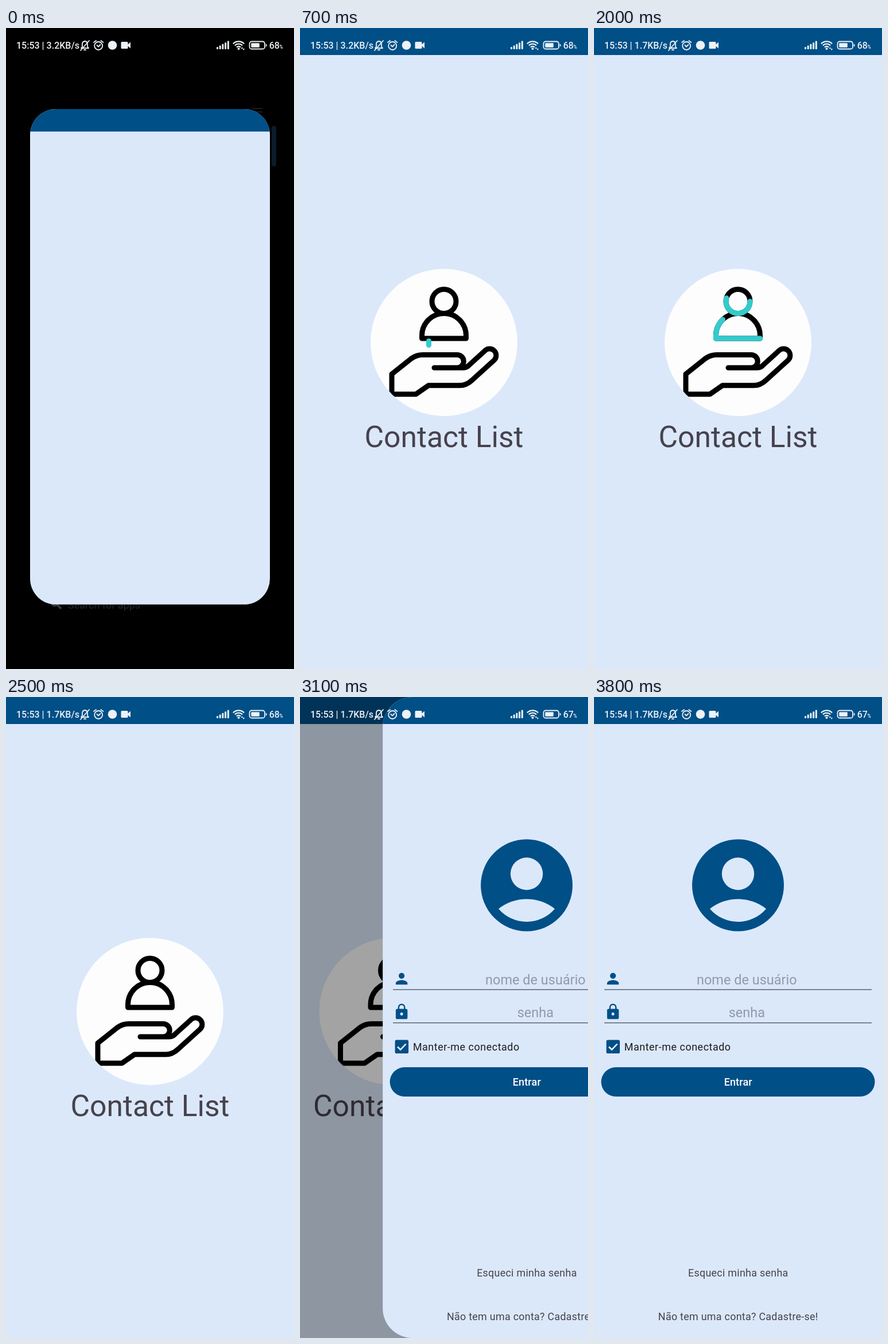
An HTML page for the animation above (3900 ms loop, 502 px wide and 1115 px high).

```html
<!DOCTYPE html>
<html lang="pt">
<head>
<meta charset="utf-8">
<title>Contact List</title>
<style>
  html, body { margin: 0; width: 100%; height: 100%; overflow: hidden; background: #000; }
  svg { display: block; width: 502px; height: 1115px; font-family: Roboto, sans-serif; }
  .paper { fill: #dbe8fa; }
  .blue { fill: #004f87; }
  .ink { fill: none; stroke: #000; stroke-width: 9; stroke-linecap: round; stroke-linejoin: round; }
  .teal { stroke: #33cbcd; }
  .soft { fill: #46424d; }
  .mid { text-anchor: middle; }
  .hint { font-size: 23.5px; fill: #9399a9; }
  .small { font-size: 17.9px; letter-spacing: .28px; }
  .rule { stroke: #5d6371; stroke-width: 1.4; }
  #bar { fill: #edf2f6; font-weight: 500; font-size: 16px; }
  #bar .line { fill: none; stroke: #edf2f6; stroke-width: 1.8; stroke-linecap: round; stroke-linejoin: round; }
</style>
</head>
<body>
<svg viewBox="0 0 502 1115">
  <defs>
    <clipPath id="openClip"><rect id="openBox" width="502" height="1115"/></clipPath>
    <clipPath id="loginClip"><rect id="loginBox" width="620" height="1115"/></clipPath>
    <clipPath id="disc"><circle cx="251" cy="547" r="128"/></clipPath>
  </defs>
  <rect width="502" height="1115"/>

  <g id="launcher">
    <path d="M429 140H447M429 146H447" stroke="#262626" stroke-width="1.5"/>
    <rect x="463" y="170" width="8" height="71" rx="4" fill="#0c1a2a"/>
    <circle cx="85" cy="999" r="6" fill="none" stroke="#3c3c3c" stroke-width="3"/>
    <path d="M89 1003L96 1010" stroke="#3c3c3c" stroke-width="3.4"/>
    <text x="108" y="1010" font-size="18" fill="#262626">Search for apps</text>
  </g>

  <g id="splash">
    <g clip-path="url(#openClip)">
      <rect class="paper" width="502" height="1115"/>
      <rect class="blue" width="502" height="47"/>
      <g id="content">
        <circle cx="251" cy="547" r="128" fill="#fdfdfe"/>
        <g clip-path="url(#disc)">
          <path class="ink" d="M234 591H274A11.2 11.2 0 0 0 274 568.5H214Q203 568.5 194 575L160 602V637H202L224 621.8H278Q290 622 300 612.5L338.7 577.5A11.5 11.5 0 0 0 323.3 560.5L293 588Q289.500 591 284 591H270"/>
          <g id="person" class="ink">
            <path d="M272 475.500A21 21 0 0 0 230 475.500A21 21 0 0 0 272 475.500Z"/>
            <path d="M289.500 540V535A38.500 38.500 0 0 0 212.500 535V540Z"/>
          </g>
          <g id="trace"></g>
          <g id="dashes"></g>
        </g>
        <text class="soft mid" x="251" y="729" font-size="51.6">Contact List</text>
      </g>
    </g>
    <rect id="dim" width="502" height="1115" opacity="0"/>
  </g>

  <g id="login">
    <g clip-path="url(#loginClip)">
      <rect class="paper" width="620" height="1115"/>
      <rect class="blue" width="620" height="47"/>
      <circle class="blue" cx="251" cy="327.5" r="80"/>
      <circle class="paper" cx="251" cy="307.5" r="28.2"/>
      <path class="paper" d="M202 368.500A79 79 0 0 1 300 368.500A64.600 64.600 0 0 1 202 368.500Z"/>
      <path class="blue" transform="translate(17.7 474.700) scale(1.278)" d="M12 12a4 4 0 1 0 0-8a4 4 0 0 0 0 8zm0 2c-2.670 0-8 1.340-8 4v2h16v-2c0-2.660-5.330-4-8-4z"/>
      <path class="blue" fill-rule="evenodd" transform="translate(17.7 532.200) scale(1.278)" d="M18 8h-1V6A5 5 0 0 0 7 6v2H6a2 2 0 0 0-2 2v10a2 2 0 0 0 2 2h12a2 2 0 0 0 2-2V10a2 2 0 0 0-2-2zm-6 9a2 2 0 1 1 0-4a2 2 0 0 1 0 4zm3.100-9H8.900V6a3.100 3.100 0 0 1 6.200 0z"/>
      <path class="rule" d="M18 509H484M18 566.700H484"/>
      <text class="hint mid" x="266.300" y="500">nome de usuário</text>
      <text class="hint mid" x="266.300" y="557">senha</text>
      <rect class="blue" x="21.500" y="596.500" width="23.500" height="23.500" rx="2.600"/>
      <path d="M26 608.500L31 613.500L40.500 603.500" fill="none" stroke="#fff" stroke-width="2.500"/>
      <text class="small" x="52.800" y="615" fill="#1b1b20" style="letter-spacing:.55px">Manter-me conectado</text>
      <rect class="blue" x="12.500" y="644" width="477" height="51" rx="25.500"/>
      <text class="mid" x="251.200" y="676.300" font-size="18" font-weight="500" letter-spacing=".13" fill="#fff">Entrar</text>
      <text class="small soft mid" x="251.300" y="1008">Esqueci minha senha</text>
      <text class="small soft mid" x="251.300" y="1084">Não tem uma conta? Cadastre-se!</text>
    </g>
  </g>

  <g id="bar">
    <text id="clock" x="18" y="36"></text>
    <path class="line" d="M131 35H144L142 32.500V28Q142 23.500 137.500 23Q133 23.500 133 28V32.500ZM136 38H139M145 22L130 39"/>
    <circle class="line" cx="161.200" cy="31" r="7"/>
    <path class="line" d="M153 25L157 22M169.400 25L165.400 22M158.500 30L161 32.500L164.500 29"/>
    <circle cx="185.500" cy="30" r="7.800"/>
    <path d="M202 24H211Q212.500 24 212.500 25.500V28.500L217 24.500V35.500L212.500 31.500V34.500Q212.500 36 211 36H202Q200.500 36 200.500 34.500V25.500Q200.500 24 202 24Z"/>
    <g id="bars"></g>
    <g id="wifi" class="line" style="stroke-width:2.300;stroke-linecap:butt"></g>
    <circle cx="405.500" cy="36" r="2"/>
    <path d="M409.700 36L411.500 33L413 36ZM412.600 36L414.200 39L416 36Z"/>
    <rect class="line" x="424.500" y="23.500" width="26.500" height="13" rx="3.600"/>
    <rect x="427.300" y="26.300" width="14.500" height="7.400" rx="1"/>
    <path d="M452.800 27.500Q454.800 28 454.800 30T452.800 32.500Z"/>
    <text id="charge" x="458.700" y="36"></text>
    <text x="476.600" y="36" font-size="8.500" font-weight="700">%</text>
  </g>
</svg>
<script>
  const LOOP = 3900, STEP = 100;
  const $ = id => document.getElementById(id);
  const set = (el, attrs) => { for (const k in attrs) el.setAttribute(k, attrs[k]); return el; };
  const add = (parent, tag, attrs) =>
    parent.appendChild(set(document.createElementNS('http://www.w3.org/2000/svg', tag), attrs));
  const clamp = x => Math.min(1, Math.max(0, x));
  const ramp = (t, a, b) => clamp((t - a) / (b - a));
  const show = (el, on) => { el.style.display = on ? '' : 'none'; };

  // Distance left on a critically damped spring
  const rest = x => x <= 0 ? 1 : (1 + x) * Math.exp(-x);
  const RATE = 0.0169;

  for (let i = 0; i < 5; i++) {
    const h = 4 + i * 2.600;
    add($('bars'), 'rect', { x: 367 + i * 4.700, y: 37 - h, width: 3, height: h, rx: 1 });
  }
  for (const r of [5, 9.300, 13.600]) {
    const d = r * Math.SQRT1_2;
    add($('wifi'), 'path', { d: `M${405.500 - d} ${37 - d}A${r} ${r} 0 0 1 ${405.500 + d} ${37 - d}` });
  }

  const traces = [...$('person').children].map(p =>
    add($('trace'), 'path', { d: p.getAttribute('d'), class: 'ink teal', pathLength: 100 }));
  const dashes = [224.500, 251, 277.500].map(x =>
    add($('dashes'), 'line', { x1: x, x2: x, class: 'ink teal' }));

  function drawIcon(t) {
    const from = 100 * ramp(t, 1750, 2300), to = 100 * ramp(t, 980, 1580);
    for (const p of traces) {
      show(p, to > from);
      set(p, { 'stroke-dasharray': `${to - from} 200`, 'stroke-dashoffset': -from });
    }
    dashes.forEach((line, i) => {
      const s = t - 650 - i * 100;
      show(line, s > 0 && s < 250);
      set(line, { y1: 551.500 - 7 * ramp(s, 100, 250), y2: 551.500 - 7 * ramp(s, 0, 50) });
    });
  }

  function draw(t) {
    const r = t < 500 ? rest(3 + RATE * t) / rest(3) : 0;
    const left = rest(RATE * (t - 2952)), p = 1 - left;

    set($('launcher'), { opacity: clamp(r * 1.3 - 0.3) });
    set($('openBox'), { height: 1115 - 80 * r, rx: 54 * clamp(4 * r) });
    set($('splash'), {
      transform: `translate(${42 * r - 125.500 * p} ${141 * r}) scale(${1 - r * 84 / 502})`
    });
    set($('dim'), { x: 125.500 * p, opacity: p / 2 });
    show($('dim'), p > 0);
    show($('content'), t >= 500);
    drawIcon(t);

    show($('login'), p > 0);
    set($('login'), { transform: `translate(${502 * left} 0)` });
    set($('loginBox'), { rx: 52 * clamp(left * 40) });

    $('clock').textContent = `15:${t < 3700 ? 53 : 54} | ${t < 2000 ? '3.2' : '1.7'}KB/s`;
    $('charge').textContent = t < 3100 ? 68 : 67;
  }

  const start = performance.now();
  function tick() {
    const t = (performance.now() - start) % LOOP;
    draw(Math.floor(t / STEP) * STEP);
    requestAnimationFrame(tick);
  }
  tick();
</script>
</body>
</html>
```
